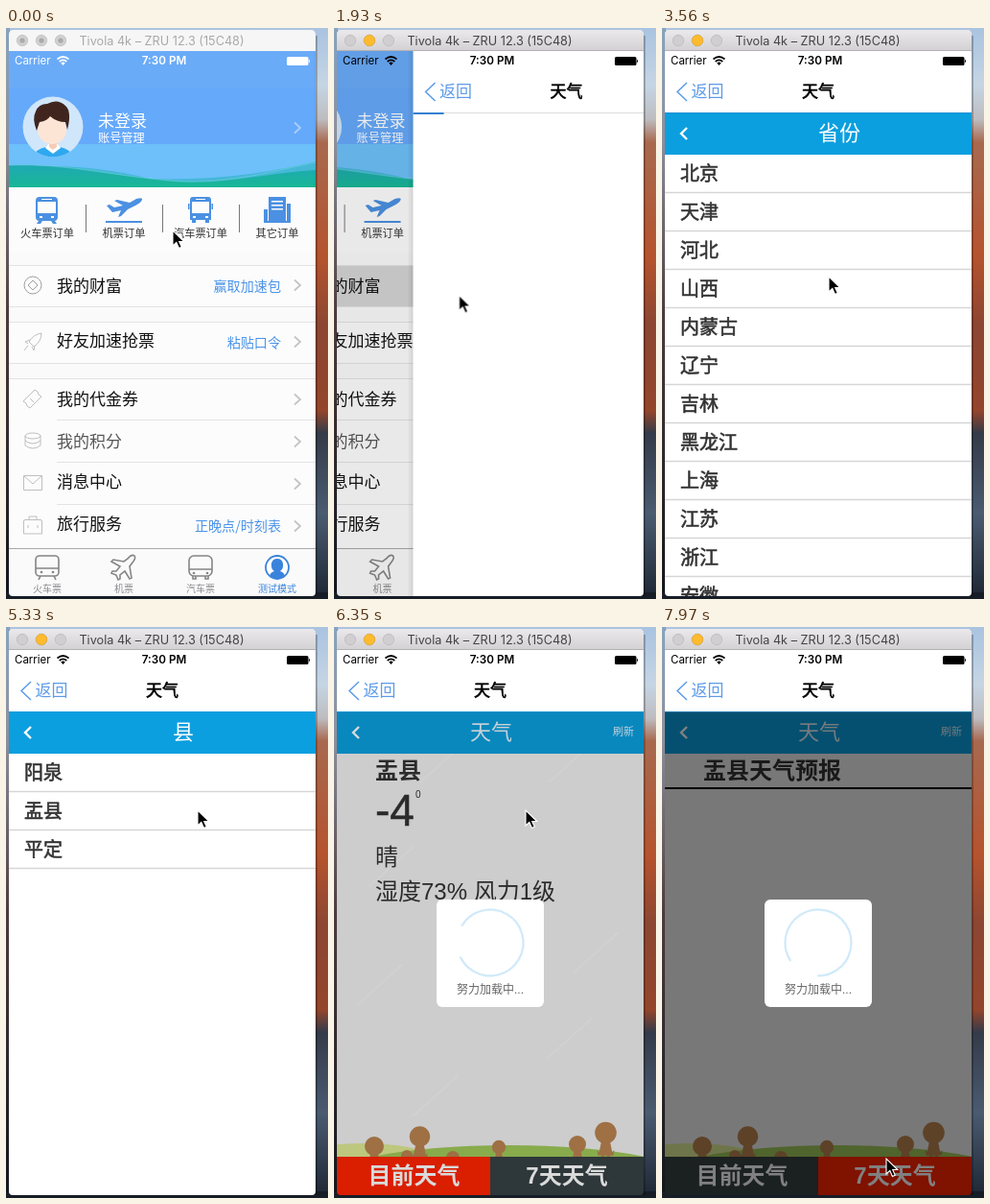
An HTML page for the animation above (8 s loop, 336 px wide and 595 px high).

```html
<!DOCTYPE html>
<html lang="zh-CN">
<head>
<meta charset="utf-8">
<title>天气</title>
<style>
html, body { margin: 0; width: 100%; height: 100%; overflow: hidden; background: #222; }
svg { display: block; width: 336px; height: 595px; font-family: "Noto Sans CJK SC", "Noto Sans CJK", sans-serif; }
.ui { font-family: Inter, "Noto Sans CJK SC", sans-serif; }
.web { font-family: "Liberation Sans", "Noto Sans CJK SC", "Noto Sans CJK", sans-serif; }
.mid { text-anchor: middle; }
.end { text-anchor: end; }
.bold { font-weight: 700; }
.line { fill: none; stroke: currentColor; }
.rows { font-size: 17px; fill: #111; }
.list { font-size: 20px; fill: #333; }
.semi { stroke: currentColor; stroke-width: .6px; }

.step { animation: 8s step-end infinite; }
.active { animation-name: active; }
.picked { animation-name: picked; }
.province { animation-name: province; }
.city { animation-name: city; }
.county { animation-name: county; }
.weather { animation-name: weather; }
.report { animation-name: report; }
.forecast { animation-name: forecast; }
.popup { animation-name: popup; }
.status { animation-name: status; }
@keyframes active { 0% { visibility: hidden } 16.625%, to { visibility: visible } }
@keyframes picked { 0% { visibility: hidden } 20.375%, to { visibility: visible } }
@keyframes province { 0% { visibility: hidden } 35.25%, to { visibility: visible } }
@keyframes city { 0% { visibility: hidden } 48.125%, to { visibility: visible } }
@keyframes county { 0% { visibility: hidden } 57.5%, to { visibility: visible } }
@keyframes weather { 0% { visibility: hidden } 72.125%, to { visibility: visible } }
@keyframes report { 0% { visibility: hidden } 77.6%, to { visibility: visible } }
@keyframes forecast { 0% { visibility: hidden } 96%, to { visibility: visible } }
@keyframes popup {
  0% { visibility: hidden } 72.125% { visibility: visible }
  81.24% { visibility: hidden } 96%, to { visibility: visible }
}
@keyframes status { 0% { color: #fff } 22.25%, to { color: #000 } }

.home, .push, .dim { animation: 8s cubic-bezier(.2, .8, .3, 1) infinite; }
.home { animation-name: home; }
.push { animation-name: push; }
.dim { animation-name: dim; }
@keyframes home { 0%, 22.42% { transform: none } 28.67%, to { transform: translateX(-96px) } }
@keyframes push { 0%, 22.42% { transform: translateX(324px) } 28.67%, to { transform: none } }
@keyframes dim { 0%, 22.42% { opacity: 0 } 28.67%, to { opacity: .1 } }

.bar { animation: bar 8s linear infinite; }
@keyframes bar { 0%, 33.375% { width: 32px } 35.25%, to { width: 320px } }
.shade { animation: shade 8s linear infinite; }
@keyframes shade {
  0%, 72.125% { opacity: 0 } 74.5%, 77.6% { opacity: .5 } 79.375% { opacity: .15 }
  81.2%, 96% { opacity: 0 } 98.5%, to { opacity: .5 }
}
.spin { animation: spin .888889s linear infinite; }
@keyframes spin { from { transform: rotate(158deg) } to { transform: rotate(518deg) } }
.streak { stroke: #fff; stroke-width: 1.3; vector-effect: non-scaling-stroke; animation: streak 2s linear -1.45s infinite; }
@keyframes streak {
  from { transform: scale(.05); opacity: 0 } 15%, 55% { opacity: 1 }
  93% { opacity: .4 } to { transform: scale(1.08); opacity: 0 }
}
.cursor { animation: cursor 8s linear infinite; }
@keyframes cursor {
  0%, 1.875% { transform: translate(174px, 211px) }
  5.5% { transform: translate(210px, 390px) }
  7.5%, 8.5% { transform: translate(222px, 517px) }
  11% { transform: translate(180px, 300px) }
  12.9% { transform: translate(143px, 151px) }
  14.75%, 16.6% { transform: translate(145px, 262px) }
  20%, 33.375% { transform: translate(130.5px, 278.5px) }
  42.5%, 51.875% { transform: translate(174px, 259px) }
  53.75%, 61.125% { transform: translate(181px, 243px) }
  63.5% { transform: translate(210px, 220px) }
  66.5%, 84.875% { transform: translate(200px, 191px) }
  92.25%, to { transform: translate(234px, 554px) }
}
</style>
</head>
<body>
<svg viewBox="0 0 336 595">
  <defs>
    <clipPath id="screen"><path d="M3 24H323V588Q323 592 319 592H7Q3 592 3 588Z"/></clipPath>
    <clipPath id="sky"><rect x="3" y="132" width="320" height="420"/></clipPath>
    <clipPath id="face"><circle cx="49" cy="103" r="31.5"/></clipPath>
    <linearGradient id="wall" x2="0" y2="1">
      <stop offset="0" stop-color="#a9c3e0"/><stop offset=".1" stop-color="#c6d5e4"/>
      <stop offset=".16" stop-color="#bdbcc0"/><stop offset=".2" stop-color="#a8694f"/>
      <stop offset=".4" stop-color="#b5532e"/><stop offset=".52" stop-color="#8c4632"/>
      <stop offset=".67" stop-color="#94452c"/><stop offset=".71" stop-color="#343b49"/>
      <stop offset=".85" stop-color="#4b5b70"/><stop offset="1" stop-color="#1d2633"/>
    </linearGradient>
    <linearGradient id="edge" x2="0" y2="1">
      <stop offset="0" stop-color="#87a3bd"/><stop offset=".2" stop-color="#8c8f9b"/>
      <stop offset=".5" stop-color="#4c3b3e"/><stop offset="1" stop-color="#10151c"/>
    </linearGradient>
    <linearGradient id="chrome" x2="0" y2="1">
      <stop offset="0" stop-color="#ebe9eb"/><stop offset="1" stop-color="#d2d0d2"/>
    </linearGradient>
    <linearGradient id="sea" x2="0" y2="1">
      <stop offset="0" stop-color="#1fa9b4"/><stop offset="1" stop-color="#18b795"/>
    </linearGradient>
    <linearGradient id="side"><stop offset="0" stop-opacity="0"/><stop offset="1" stop-opacity=".1"/></linearGradient>
    <path id="next" class="line" d="M0 -5.5 6 0 0 5.5" stroke-width="1.8"/>
    <path id="plane" d="M-18 -4 -15 -5 -10 -2 -1 -4 -10 -9 -7 -10 6 -7 13 -11Q20 -13 19 -10 18 -7 12 -4L4 0 -3 7 -6 8 -3 1 -12 3Z"/>
    <g id="man"><circle r="10"/><path d="M-4 8H4L6 18 8 16 7 21H4V25H1V21H-1V25H-4V21H-7L-8 16 -6 18Z"/></g>
    <g id="head">
      <rect x="3" y="88.5" width="320" height="43.5" fill="#0b9fdf"/>
      <path d="M26 104 20 110 26 116" fill="none" stroke="#fff" stroke-width="2.4"/>
    </g>
    <g id="dots" stroke-width=".7"><circle cx="17" cy="13" r="5.7"/><circle cx="37" cy="13" r="5.7"/><circle cx="57" cy="13" r="5.7"/></g>
    <path id="cap" d="M3 24V7Q3 2 8 2H318Q323 2 323 7V24Z"/>
    <text id="name" class="mid" x="162.5" y="18" font-size="12.7">Tivola 4k – ZRU 12.3 (15C48)</text>
  </defs>

  <rect width="336" height="595" fill="url(#wall)"/>
  <rect width="4" height="595" fill="url(#edge)"/>
  <rect y="588" width="336" height="7" fill="#171d26"/>
  <rect x="322" y="8" width="3" height="584" opacity=".25"/>

  <g class="ui">
    <use href="#cap" fill="#f6f6f6"/>
    <use href="#dots" fill="#d0d0d0" stroke="#bbb"/>
    <g fill="#aaa"><circle cx="17" cy="13" r="2.6"/><circle cx="37" cy="13" r="2.6"/><circle cx="57" cy="13" r="2.6"/></g>
    <use href="#name" fill="#a9a9a9"/>
    <g class="step active">
      <use href="#cap" fill="url(#chrome)"/>
      <path d="M3 23.5H323" stroke="#b4b2b4"/>
      <use href="#dots" fill="#d0ced0" stroke="#b9b7b9"/>
      <circle cx="37" cy="13" r="5.8" fill="#fdbb2d" stroke="#e0a02a" stroke-width=".6"/>
      <use href="#name" fill="#444"/>
    </g>
  </g>

  <g clip-path="url(#screen)">
    <g class="home">
      <rect x="3" y="24" width="320" height="568" fill="#fcfcfc"/>
      <rect x="3" y="24" width="320" height="40" fill="#6aabf8"/>
      <rect x="3" y="62" width="320" height="59" fill="#65a9fa"/>
      <rect x="3" y="121" width="320" height="45" fill="#6dc0fa"/>
      <path d="M3 147Q70 138 150 157 240 160 323 139V166H3Z" fill="#45b8d8"/>
      <path d="M3 143C60 141 100 152 160 158 220 166 270 151 323 148V166H3Z" fill="url(#sea)"/>
      <path d="M3 143C60 141 100 152 160 158 220 166 270 151 323 140" fill="none" stroke="#8fe0dd" stroke-width=".6" opacity=".6"/>
      <g clip-path="url(#face)">
        <circle cx="49" cy="103" r="32" fill="#d0e6fa"/>
        <path d="M29 135Q30 126 42 124H56Q68 126 69 135Z" fill="#2ea8ee"/>
        <path d="M41 125 44 121H54L57 125 49 131Z" fill="#fff"/>
        <path d="M45 115H53V124L49 127 45 124Z" fill="#f6cdb5"/>
        <ellipse cx="48" cy="106" rx="15" ry="15" fill="#fde5d6"/>
        <path d="M32 107Q27 94 31 87 34 79 43 79 54 73 62 81 69 87 64 106L62 98Q53 98 46 92 43 97 35 98Z" fill="#40251e"/>
      </g>
      <g fill="#fff"><text x="96" y="103" font-size="17">未登录</text><text x="96" y="119" font-size="12.2">账号管理</text></g>
      <use href="#next" x="301" y="104" color="#a9cffb"/>

      <path d="M83.5 184V213M163.5 184V213M243.5 184V213" stroke="#777"/>
      <g fill="#4b90e2">
        <path fill-rule="evenodd" d="M35 176H50Q54 176 54 180V197Q54 201 50 201H35Q31 201 31 197V180Q31 176 35 176ZM33 181V193H52V181ZM37 178V179H48V178ZM35 196V198H38V196ZM47 196V198H50V196Z"/>
        <path d="M34 201H38L36 204H32ZM47 201H51L53 204H49Z"/>
        <use href="#plane" x="123" y="189"/><rect x="104" y="201" width="38" height="2"/>
        <path fill-rule="evenodd" d="M195 176H211Q214 176 214 179V200H192V179Q192 176 195 176ZM194 181V193H212V181ZM198 178V179H208V178ZM195 196V198H198V196ZM208 196V198H211V196Z"/>
        <path d="M194 200H198V203H194ZM208 200H212V203H208ZM190 183H191.5V189H190ZM214.5 183H216V189H214.5Z"/>
        <path fill-rule="evenodd" d="M274 176H292V202H274ZM277 180V181.5H289V180ZM277 184V185.5H289V184ZM277 188V189.5H289V188Z"/>
        <path d="M269 189H273V202H269ZM293 183H297V202H293ZM269 201H297V203H269Z"/>
      </g>
      <g class="mid" font-size="11.2" fill="#333"><text x="43" y="218">火车票订单</text><text x="123" y="218">机票订单</text><text x="203" y="218">汽车票订单</text><text x="283" y="218">其它订单</text></g>

      <g fill="#fafafa"><rect x="3" y="234" width="320" height="13"/><rect x="3" y="291" width="320" height="15"/><rect x="3" y="350" width="320" height="15"/></g>
      <rect class="step picked" x="3" y="247" width="320" height="44" fill="#d4d4d4"/>
      <path d="M3 247.5H323M3 290.5H323M3 306.5H323M3 349.5H323M3 365.5H323M53 408.5H323M53 452.5H323M53 496.5H323" stroke="#e3e3e3"/>
      <g class="rows">
        <text x="53" y="275">我的财富</text><text x="53" y="332">好友加速抢票</text><text x="53" y="393">我的代金券</text>
        <text x="53" y="437" fill="#555">我的积分</text><text x="53" y="479">消息中心</text><text x="53" y="523">旅行服务</text>
      </g>
      <g class="end" font-size="14.1" fill="#4b94e8"><text x="287" y="274">赢取加速包</text><text x="287" y="333">粘贴口令</text><text x="287" y="524">正晚点/时刻表</text></g>
      <g id="arrows" color="#c4c4c8"></g>
      <g class="line" color="#b8b8b8" stroke-width=".9">
        <g color="#969696"><circle class="line" cx="28" cy="268" r="9"/><path class="line" d="M28 263 33 268 28 273 23 268Z"/></g>
        <path d="M37 318Q29 319 24 327L29 332Q37 327 37 318ZM25 325 20 327 23 329M30 331 29 336 27 332M23 331 19 336"/>
        <path d="M18 389 30 377 33 379 34 382 37 384 25 396 22 394 21 391ZM25 386 29 390"/>
        <ellipse cx="28" cy="425" rx="8" ry="3"/><path d="M20 425V435Q28 441 36 435V425M20 430Q28 436 36 430"/>
        <path d="M18.5 466.5H37.5V481.5H18.5ZM19 467 28 475 37 467"/>
        <path d="M20 512.5H36Q37.5 512.5 37.5 514V527H18.5V514Q18.5 512.5 20 512.5ZM24 512V509H32V512M23 518V521M33 518V521"/>
      </g>

      <rect x="3" y="541" width="320" height="51" fill="#fafafa"/><path d="M3 542.5H323" stroke="#a9a9a9"/>
      <g class="line" color="#858585" stroke-width="1.6">
        <rect x="31" y="550" width="24" height="21" rx="4"/><path d="M31 563H55M36 571 34 575M50 571 52 575"/>
        <path d="M134 550Q131 548 127 553L123 556 112 554 110 556 119 561 115 566 111 566 110 568 115 570 117 575 119 574 119 570 124 566 129 574 131 573 129 561 132 557Q136 552 134 550Z"/>
        <rect x="191" y="550" width="24" height="21" rx="5"/><path d="M191 564H215M195 571V574H198V571M208 571V574H211V571"/>
      </g>
      <g fill="#858585"><circle cx="37" cy="567" r="1.3"/><circle cx="49" cy="567" r="1.3"/><circle cx="196" cy="568" r="1.3"/><circle cx="210" cy="568" r="1.3"/></g>
      <circle cx="283" cy="562" r="12" fill="#fff" stroke="#3a83dc" stroke-width="1.8"/>
      <path d="M275 571Q276 567 280 566 276 563 277 558 278 553 283 553 288 553 289 558 290 563 286 566 290 567 291 571 283 576 275 571Z" fill="#3a83dc"/>
      <g class="mid" font-size="10" fill="#8b8b8f"><text x="43" y="588">火车票</text><text x="123" y="588">机票</text><text x="203" y="588">汽车票</text><text x="283" y="588" fill="#3a83dc">测试模式</text></g>
    </g>
    <rect class="dim" x="3" y="24" width="320" height="568"/>

    <g class="push">
      <rect x="-3" y="24" width="6" height="568" fill="url(#side)"/>
      <rect x="3" y="24" width="320" height="568" fill="#fff"/>
      <path d="M3 88.5H323" stroke="#dcdcdc"/>
      <path d="M26 57 16 66.5 26 76" fill="none" stroke="#5d9be8" stroke-width="1.5"/>
      <text x="30.5" y="72" font-size="17" fill="#5d9be8">返回</text>
      <text class="mid semi" x="163" y="72" font-size="17" color="#000">天气</text>
      <rect class="bar" x="3" y="88" width="32" height="2" fill="#3580d0"/>
    </g>

    <g id="lists" class="list"></g>

    <g class="step weather web">
      <rect x="3" y="132" width="320" height="460" fill="#f0f0f0"/>
      <use href="#head"/>
      <text class="mid" x="164" y="117" font-size="22" fill="#e8f6fd">天气</text>
      <text x="291" y="113" font-size="11" fill="#e8f6fd">刷新</text>
    </g>
    <g class="step report web" fill="#333">
      <g id="streaks" clip-path="url(#sky)"></g>
      <text class="bold" x="43" y="158" font-size="24">盂县</text>
      <text x="43" y="207" font-size="46" stroke="#333" stroke-width=".5">-4</text>
      <text x="85" y="178" font-size="10">0</text>
      <text x="43" y="248" font-size="24">晴</text>
      <text x="43" y="284" font-size="24">湿度73% 风力1级</text>
    </g>
    <g class="step forecast web">
      <rect x="3" y="132" width="320" height="420" fill="#f0f0f0"/>
      <text class="bold" x="43" y="158" font-size="24" fill="#333">盂县天气预报</text>
      <rect x="3" y="167" width="320" height="2"/>
    </g>
    <g class="step weather web">
      <ellipse cx="30" cy="572" rx="100" ry="34" fill="#dde993"/>
      <ellipse cx="182" cy="580" rx="200" ry="40" fill="#9fc85a"/>
      <g fill="#b98350">
        <use href="#man" transform="translate(42 541)"/><use href="#man" transform="translate(89.5 531) scale(1.07)"/>
        <use href="#man" transform="translate(76 551) scale(.6)"/><use href="#man" transform="translate(124 553) scale(.7)"/>
        <use href="#man" transform="translate(172 542) scale(.72)"/><use href="#man" transform="translate(254 539) scale(.9)"/>
        <use href="#man" transform="translate(283.5 527) scale(1.13)"/>
      </g>
      <rect x="3" y="552" width="160" height="40" fill="#ff2400"/><rect x="163" y="552" width="160" height="40" fill="#364143"/>
    </g>
    <g class="step forecast"><rect x="3" y="552" width="160" height="40" fill="#364143"/><rect x="163" y="552" width="160" height="40" fill="#ff2400"/></g>
    <g class="step weather web mid bold" font-size="24" fill="#fff"><text x="83.5" y="580">目前天气</text><text x="243" y="580">7天天气</text></g>
    <rect class="shade" x="3" y="88.5" width="320" height="503.5"/>
    <g class="step popup">
      <rect x="107" y="284" width="112" height="112" rx="6" fill="#fff"/>
      <g transform="translate(163 329)"><circle class="spin" r="34.5" fill="none" stroke="#c9e6f8" stroke-width="2" pathLength="360" stroke-dasharray="305 55"/></g>
      <text class="web mid" x="163" y="382" font-size="12" fill="#666">努力加载中...</text>
    </g>

    <g class="step status ui" fill="currentColor">
      <text x="9" y="38" font-size="11.5">Carrier</text>
      <text class="mid" x="165" y="38" font-size="11.7" font-weight="600">7:30 PM</text>
      <path class="line" d="M53.5 32.5Q59.5 27.5 65.5 32.5M55.7 35Q59.5 31.7 63.3 35" stroke-width="1.7"/>
      <path d="M57.3 36.5Q59.5 34.7 61.7 36.5L59.5 39Z"/>
      <rect x="293" y="30" width="22.5" height="9" rx="1.5"/><path d="M316 32.5Q318 34.3 316 36.5Z"/>
    </g>
  </g>

  <path class="cursor" d="M0 0V16L3.8 12.5 6.5 18.5 9.3 17.3 6.7 11.5H11.8Z" stroke="#fff" stroke-width="1.1"/>
</svg>
<script>
const fill = (id, html) => document.getElementById(id).innerHTML = html;
const row = (name, i) =>
  `<text class="semi" color="#333" x="19" y="${159 + i * 40}">${name}</text><path d="M3 ${171.5 + i * 40}H323" stroke="#d6d6d6" stroke-width="1.5"/>`;
const list = (cls, title, names) => `<g class="step ${cls}">
  <rect x="3" y="89" width="320" height="503" fill="#fff"/><use href="#head"/>
  <text class="mid" x="185" y="117" font-size="22" fill="#fff">${title}</text>
  ${names.split(" ").map(row).join("")}</g>`;

fill("lists",
  list("province", "省份", "北京 天津 河北 山西 内蒙古 辽宁 吉林 黑龙江 上海 江苏 浙江 安徽") +
  list("city", "市", "太原 大同 阳泉 晋中 长治 晋城 临汾 运城 朔州 忻州 吕梁") +
  list("county", "县", "阳泉 盂县 平定"));
fill("arrows", [268, 327, 387, 431, 475, 519].map(y => `<use href="#next" x="301" y="${y}"/>`).join(""));
fill("streaks", [[90, 162], [224, 162], [36, 271], [250, 360], [24, 394], [132, 394], [222, 450], [82, 510]]
  .map(([x, y]) => `<g transform="translate(${x} ${y})"><path class="streak" d="M0 0 48 -43"/></g>`).join(""));
</script>
</body>
</html>
```
